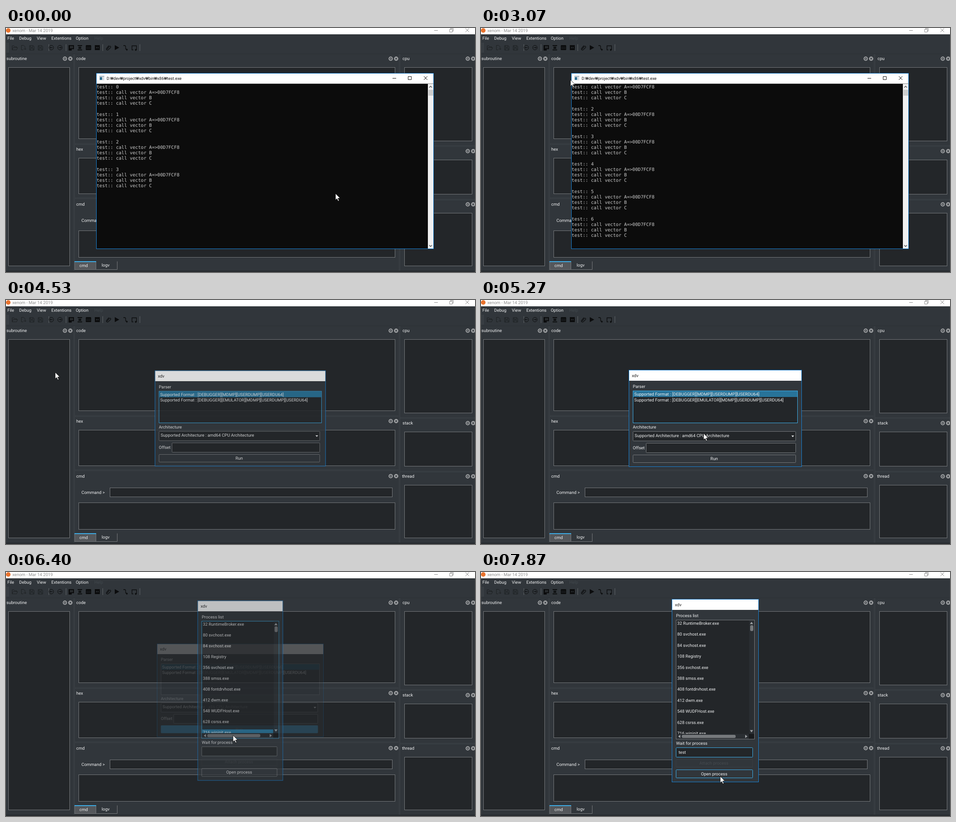
Recreate the animation shown at these times as an HTML page. Size 1035 by 541 pixels, loop 8 s.

```html
<!DOCTYPE html>
<html lang="en">
<head>
<meta charset="utf-8">
<title>Debugger session</title>
<style>
html, body { margin: 0; width: 100%; height: 100%; overflow: hidden; background: #31363b; }
svg { display: block; }
text { font: 9.5px Roboto, "Open Sans", sans-serif; fill: #eff0f1; text-rendering: geometricPrecision; }
.console text { font: 10.15px "DejaVu Sans Mono", "Liberation Mono", monospace; fill: #cccccc; }
.dark { fill: #111; }
</style>
</head>
<body>
<svg id="stage" width="1035" height="541" viewBox="0 0 1035 541"></svg>
<script>
const LOOP = 8000;
const BG = '#31363b', PANEL = '#232629', EDGE = '#76797c', FOCUS = '#3daee9', FRAME = '#1883d7';

// Markup helpers
const rect = (x1, y1, x2, y2, fill, extra = '') =>
  `<rect x="${x1}" y="${y1}" width="${x2 - x1}" height="${y2 - y1}" fill="${fill}" ${extra}/>`;
const box = (x1, y1, x2, y2, fill = PANEL, stroke = EDGE, extra = '') =>
  rect(x1 + .5, y1 + .5, x2 - .5, y2 - .5, fill, `stroke="${stroke}" ${extra}`);
const label = (x, y, s, extra = '') => `<text x="${x}" y="${y}" ${extra}>${s}</text>`;
const line = (d, stroke, extra = '') => `<path d="${d}" fill="none" stroke="${stroke}" ${extra}/>`;
const shape = (d, fill, extra = '') => `<path d="${d}" fill="${fill}" ${extra}/>`;
const group = (id, body) => `<g id="${id}">${body}</g>`;

const windowButtons = (xMin, xMax, xClose, y, restore) =>
  `<path d="M${xMin - 4} ${y + .5}h8M${xClose - 4} ${y - 4}l8 8m0-8l-8 8` +
  (restore ? `M${xMax - 4} ${y - 2}h6v6h-6zm2 0v-2h6v6h-2` : `M${xMax - 3.5} ${y - 3.5}h7v7h-7z`) +
  '" fill="none" stroke="currentColor"/>';

const dockTitle = (x, y, name, right) => {
  const cy = y - 3;
  return label(x, y, name) + [right - 12, right].map(cx => `<circle cx="${cx}" cy="${cy}" r="4.7" fill="#a3a5a7"/>`).join('') +
    `<circle cx="${right - 12}" cy="${cy}" r="2" fill="none" stroke="${BG}" stroke-width="1.3"/>` +
    line(`M${right - 2} ${cy - 2}l4 4m0-4l-4 4`, BG, 'stroke-width="1.2"');
};

function toolbar() {
  const dim = '#1d2022', ink = '#0b0c0d';
  const disk = x => line(`M${x - 5} 39h8l2 2v8h-10zm2 0v4h5v-4m-5 10v-4h6v4`, dim);
  const arrow = (x, s) => `<circle cx="${x}" cy="43.5" r="5" fill="none" stroke="${ink}"/>` +
    line(`M${x - 3 * s} 43.5h${6 * s}m${-2 * s}-2l${2 * s} 2l${-2 * s} 2`, ink);
  return line('M2.5 33v22M5.5 33v22', '#5b6064', 'stroke-dasharray="1 1"') +
    line('M94.5 36v15M132.5 36v15M213.5 36v15M295.5 36v15', '#5f6468') +
    line('M13.5 48.500v-9h4l1 2h5v2m-10 5l2-5h10l-2 5z', dim) +
    line('M34 38.500h5l3 3v3m-8-6v10h4m1-2h5m-2-2l2 2l-2 2', dim) + disk(57) + disk(76) +
    arrow(100, -1) + arrow(119, 1) +
    rect(138, 38, 150, 47, ink) + rect(141, 40, 148, 45, '#26292c') + rect(138, 46, 145, 50, ink) +
    line('M158 39h10M158 48.500h10M160 42.500h6M160 45h6', ink, 'stroke-width="2"') +
    rect(176, 38, 188, 49, ink, 'rx="1.5"') + line('M177 42.500h10M177 45.500h10', '#32373b', 'stroke-width=".6"') +
    rect(196, 38, 207, 49, ink) + rect(199, 42, 204, 45, '#33383c') + rect(200.5, 42, 202.5, 45, ink) +
    line('M223 47l5-6a1.700 1.700 0 0 1 3 2l-5 5a2.500 2.500 0 0 1-4-3l5-6', ink, 'stroke-width="1.2"') +
    shape('M240 38l10 5.500l-10 5.500z', ink) +
    line('M259 39h3q2 0 2 3v3q0 3 3 3h1m-2-2l2 2l-2 2', ink, 'stroke-width="1.3"') +
    line('M281 48.500h-3v-9h10v9h-3m2-2l-2 2l2 2', ink, 'stroke-width="1.3"');
}

function mainWindow() {
  const menu = [[3, 'File'], [29, 'Debug'], [68, 'View'], [100, 'Extentions'], [154, 'Option']];
  const dots = 'stroke-dasharray="1 2"';
  return rect(0, 0, 1035, 541, BG) + rect(0, 0, 1035, 14, '#fff') +
    '<circle cx="5" cy="5.500" r="5" fill="#e9722c"/>' +
    group('caption', label(14, 9, 'xenom - Mar 14 2019', 'style="fill:currentColor"') +
      windowButtons(949, 983, 1018, 5, true)) +
    menu.map(([x, s]) => label(x, 26, s)).join('') + label(195, 26, 'Help', 'style="fill:#42484d"') +
    rect(0, 57, 1035, 58, '#2b3034') +
    box(137, 33, 152, 54, '#2c3a43', FOCUS, 'id="hover"') + toolbar() +
    line('M149.500 59v478M151.500 59v478M867.500 59v478M869.500 59v478' +
      'M153 256.500h714M153 258.500h714M153 376.500h714M153 378.500h714' +
      'M871 260.500h164M871 262.500h164M871 379.500h164M871 381.500h164', '#50565b', dots) +
    dockTitle(1, 71, 'subroutine', 142) + dockTitle(155, 71, 'code', 861) + dockTitle(875, 71, 'cpu', 1031) +
    dockTitle(155, 271.500, 'hex', 861) + dockTitle(875, 276, 'stack', 1031) +
    dockTitle(155, 393.500, 'cmd', 861) + dockTitle(874, 394, 'thread', 1031) +
    box(5, 87, 141, 528) + box(160, 87, 859, 246) + box(160, 288, 859, 368) +
    box(229, 416, 853, 437) + box(160, 449, 859, 509) +
    box(879, 87, 1029, 251) + box(879, 292, 1029, 369) + box(879, 410, 1029, 528) +
    label(166.500, 430, 'Command &gt;') +
    box(151, 517, 199, 536, '#54575b') + rect(151, 517, 199, 519, FOCUS) +
    line('M199 535.500h46.500v-18', EDGE) + label(162, 530, 'cmd') + label(211, 529, 'logv') +
    rect(0, 538, 1035, 541, '#272b2f');
}

function consoleWindow() {
  return box(199, 100, 944, 490, '#0c0c0c', FRAME) + rect(200, 101, 943, 123.500, '#fff') +
    rect(206, 106, 217, 116, '#d7dde2') + rect(206, 106, 217, 108, '#a8b4be') + rect(207, 109, 212, 115, '#2c6f91') +
    label(222, 115, 'D:₩dev₩project₩xdv₩bin₩x86₩test.exe', 'style="fill:#111;font-size:9.200px"') +
    `<g color="#111">${windowButtons(857, 891, 926, 111, false)}</g>` +
    rect(931, 124, 943, 489, '#f0f0f0') + rect(932, 137, 943, 150, '#cdcdcd') +
    line('M934 132l3-3l3 3M934 481.500l3 3l3-3', '#505050', 'stroke-width="1.400"') +
    '<g class="console">' +
    Array.from({ length: 30 }, (_, i) => label(200, (133.800 + i * 12.2).toFixed(1), '', 'data-row')).join('') + '</g>';
}

const dialogFrame = (x1, y1, x2, y2) =>
  box(x1, y1, x2, y2, BG, FRAME) + rect(x1 + 1, y1 + 1, x2 - 1, y1 + 24, '#fff') +
  label(x1 + 7, y1 + 16, 'xdv', 'style="fill:#222"');
const centered = (x, y, s, extra = '') => label(x, y, s, `text-anchor="middle" ${extra}`);

function parserDialog() {
  const arch = 'Supported Architecture : ';
  return dialogFrame(326, 155, 708, 370) + label(335, 195, 'Parser') +
    box(335, 201, 699, 273, PANEL, EDGE, 'id="formats"') + rect(336, 202, 698, 215, '#18465d', 'id="format"') +
    label(338, 212, 'Supported Format : [DEBUGGER][MDMP][USERDUMP][USERDU64]') +
    label(338, 225, 'Supported Format : [DEBUGGER][EMULATOR][MDMP][USERDUMP][USERDU64]') +
    label(335, 285, 'Architecture') + box(335, 291, 695, 313, PANEL, EDGE, 'id="combo" rx="1"') +
    label(339, 304, '', 'id="arch"') + shape('M685 300.500h6l-3 3.500z', '#eff0f1') +
    label(335, 331, 'Offset') + box(364, 317, 695, 339, PANEL, EDGE, 'rx="1"') +
    box(335, 343, 695, 361, BG, EDGE, 'id="run" rx="1"') + centered(514.500, 355, 'Run') +
    group('popup', box(335, 291, 695, 336, PANEL, EDGE) + rect(336, 313, 694, 335, '#287399') +
      label(339, 305, arch + 'amd64 CPU Architecture') + label(339, 327, arch + 'x86 CPU Architecture'));
}

function processDialog() {
  const names = ['32 RuntimeBroker.exe', '80 svchost.exe', '84 svchost.exe', '108 Registry', '356 svchost.exe',
    '388 smss.exe', '408 fontdrvhost.exe', '412 dwm.exe', '548 WUDFHost.exe', '628 csrss.exe', '716 wininit.exe'];
  const off = 'style="fill:#454a4f"';
  return dialogFrame(421, 60, 613, 466) + label(430.500, 100, 'Process list') +
    box(430, 106, 604, 371, PANEL, EDGE, 'id="list"') +
    '<clipPath id="rows"><path d="M431 107h160v252h-160z"/></clipPath><g clip-path="url(#rows)">' +
    rect(431, 350.500, 591, 363, '#287399', 'id="row"') +
    names.map((s, i) => label(433, (117 + i * 24.4).toFixed(1), s)).join('') + '</g>' +
    rect(592, 107, 603, 359, '#2a2e32') + rect(431, 359, 591, 370, '#2a2e32') + rect(591, 359, 603, 370, '#191b1d') +
    rect(594, 118, 601, 131, EDGE, 'rx="3"') + rect(443, 361, 562, 368, EDGE, 'rx="3"') +
    shape('M593.500 115.500l3.500-5l3.500 5zM593.500 350.500l3.500 5l3.500-5zM440 361l-5 3.500l5 3.500zM583 361l5 3.500l-5 3.500z', '#a0a3a6') +
    label(430.500, 383, 'Wait for process') + box(430, 389, 600, 411, PANEL, EDGE, 'id="wait" rx="1"') +
    label(436, 403, '', 'id="typed"') + rect(0, 395, 1, 406, '#eff0f1', 'id="caret"') +
    box(430, 415, 600, 433, BG, '#383d42') + centered(514, 427, 'Attach process', off) +
    box(430, 438, 600, 457, BG, EDGE, 'id="open" rx="1"') + centered(514.500, 450.500, 'Open process');
}

const stage = document.getElementById('stage');
stage.innerHTML = mainWindow() + group('console', consoleWindow()) + group('parser', parserDialog()) +
  group('process', processDialog()) +
  shape('M0 0V14.500L3.300 11.500L5.800 17L8 16L5.500 10.600H10.300Z', '#fff', 'id="cursor" stroke="#000" stroke-width=".8"');

const el = id => document.getElementById(id);
const set = (id, name, value) => el(id).setAttribute(name, value);
const show = (id, on) => set(id, 'display', on ? 'inline' : 'none');
const outline = (id, on) => set(id, 'stroke', on ? FOCUS : EDGE);
const rows = [...stage.querySelectorAll('[data-row]')];
const clamp = v => Math.max(0, Math.min(1, v));

// time, x, y of the pointer
const track = [
  [0, 727, 367], [70, 735, 360], [130, 751, 335], [200, 700, 255], [265, 615, 223], [330, 527, 245], [470, 520, 262],
  [700, 455, 370], [930, 392, 423], [1070, 385, 422], [1500, 290, 400], [1870, 247, 393], [1930, 247, 395],
  [2270, 254, 428], [2470, 253, 427], [2850, 232, 240], [3150, 185, 70], [3330, 160, 46], [3500, 148, 40],
  [4200, 147, 40], [4330, 144, 48], [4530, 108, 160], [4750, 230, 215], [5000, 420, 270], [5350, 512, 303],
  [5500, 508, 305], [5730, 504, 327], [5930, 504, 327], [6180, 503, 351], [6400, 501, 362], [6730, 503, 390],
  [6870, 504, 399], [7270, 504, 399], [7530, 526, 445], [7670, 534, 451], [7870, 528, 453], [8000, 528, 453]
];

function pointer(t) {
  const i = track.findIndex((k, n) => n && t <= k[0]);
  const [a, b] = [track[i - 1], track[i]];
  const u = (t - a[0]) / (b[0] - a[0]);
  return [a[1] + (b[1] - a[1]) * u, a[2] + (b[2] - a[2]) * u];
}

function consoleLines(t) {
  const out = [];
  for (let n = 0; n < 8; n++) {
    const start = n < 4 ? -1000 : 330 + (n - 4) * 1070;
    if (t >= start) out.push(`test:: ${n}`, 'test:: call vector A=>00D7FCF8');
    if (t >= start + 140) out.push('test:: call vector B', 'test:: call vector C', '');
  }
  return out.slice(Math.max(0, out.length - 29));
}

function fade(id, cx, cy, opacity, shrink) {
  show(id, opacity > 0);
  const s = 1 - shrink * (1 - opacity);
  set(id, 'opacity', opacity);
  set(id, 'transform', `translate(${cx} ${cy}) scale(${s}) translate(${-cx} ${-cy})`);
}
const opening = (t, start, span) => 1 - (1 - clamp((t - start) / span)) ** 2;

function draw(t) {
  const [x, y] = pointer(t);
  set('cursor', 'transform', `translate(${x} ${y})`);
  set('caption', 'color', t >= 4270 && t < 4400 ? '#000' : '#8c8c8c');
  show('hover', x >= 137 && x < 153 && y >= 33 && y < 54);

  show('console', t < 4270);
  const lines = consoleLines(t);
  rows.forEach((row, i) => row.textContent = lines[i] || '');

  const closing = clamp((t - 6260) / 180);
  fade('parser', 517, 262.5, opening(t, 4400, 220) * (1 - closing), closing ? .047 : .075);
  const listFocus = t < 5400;
  outline('formats', listFocus);
  set('format', 'fill', listFocus ? '#287399' : '#18465d');
  outline('combo', !listFocus && t < 6200);
  el('arch').textContent = `Supported Architecture : ${t < 5990 ? 'amd64' : 'x86'} CPU Architecture`;
  show('popup', t >= 5530 && t < 5930);
  outline('run', t >= 6130);
  set('run', 'fill', t >= 6200 ? FOCUS : BG);

  fade('process', 517, 263, opening(t, 6300, 230), .053);
  const typing = t >= 6870;
  outline('list', !typing);
  show('row', t < 6700);
  outline('wait', typing);
  const typed = 'test'.slice(0, Math.max(0, Math.floor((t - 6930) / 80)));
  el('typed').textContent = typed;
  show('caret', typing && t < 7700);
  set('caret', 'x', 436 + (typed ? el('typed').getComputedTextLength() : 0));
  outline('open', y >= 438 && t > 7000);
}

function tick() {
  draw(performance.now() % LOOP);
  requestAnimationFrame(tick);
}
tick();
</script>
</body>
</html>
```
